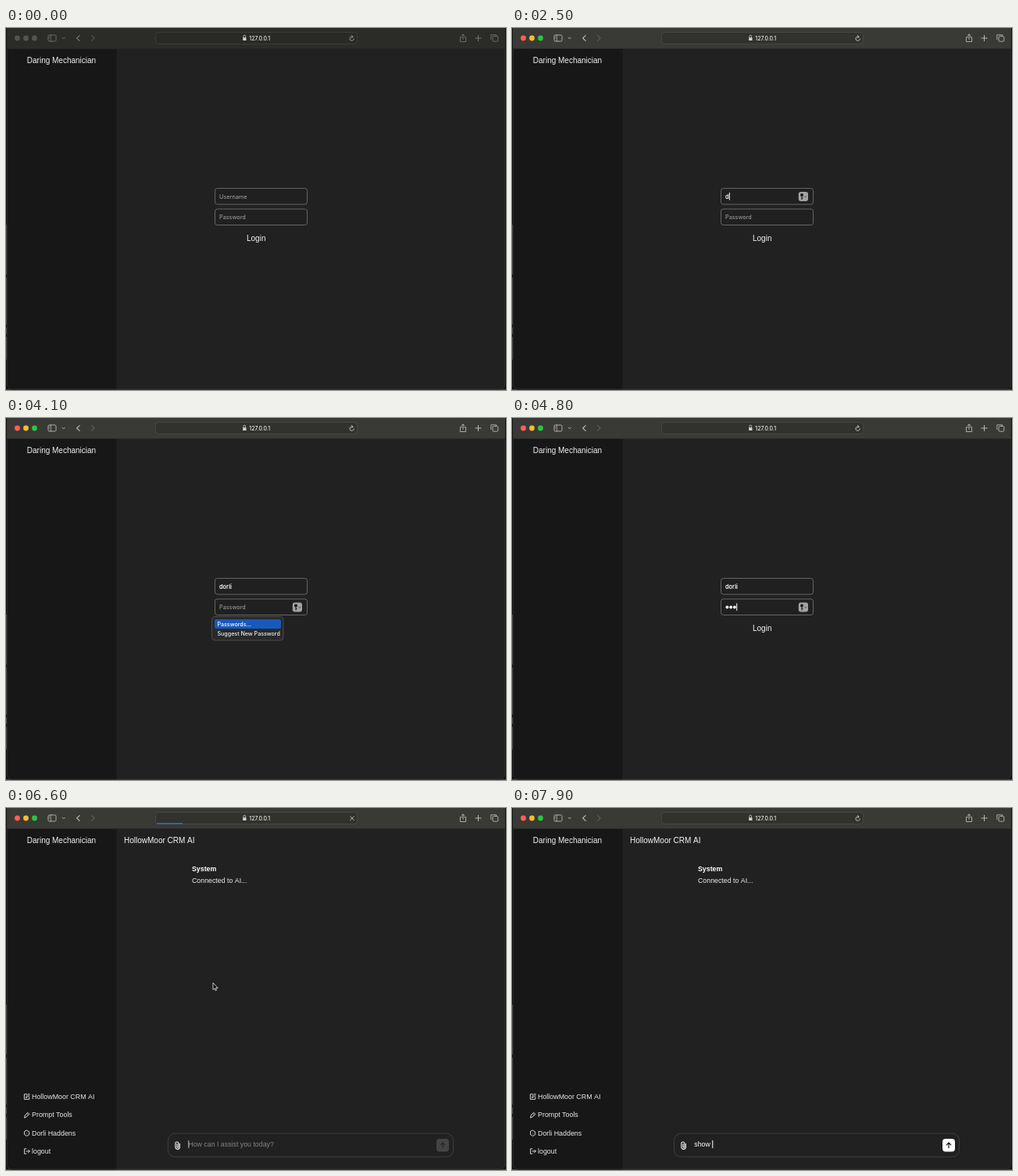
Animation of 640x464 px, one loop 8 s. Source, as an HTML page with a canvas:

```html
<!DOCTYPE html>
<html lang="en">
<head>
<meta charset="utf-8">
<title>Login and chat</title>
<style>
  html, body { margin: 0; width: 640px; height: 464px; overflow: hidden; background: #111; }
  canvas { display: block; }
</style>
</head>
<body>
<canvas id="stage" width="640" height="464"></canvas>
<script>
const ctx = document.getElementById('stage').getContext('2d');
const LOOP = 8000, STEP = 100;
const PAGE_FONT = '"Liberation Sans", Arial, sans-serif';
const UI_FONT = 'Inter, Roboto, sans-serif';
const APP = 'HollowMoor CRM AI';

const TIMES = { enter: 1000, activate: 1900, tab: 3400, menu: 3600, submit: 6000, load: 6200, loaded: 6800 };
const NAME_KEYS = [2400, 2700, 2800, 3000, 3200];
const PASS_KEYS = [4300, 4500, 4600, 5000, 5100, 5300, 5500];
const PROMPT_KEYS = [[7600, 's'], [7700, 'sh'], [7800, 'show'], [7900, 'show ']];
const POINTER_PATH = [[1000, 41, 16], [1400, 297, 130], [1800, 282, 216]];

const between = (t, a, b) => t >= a && t < b;
const lastKey = (keys, t, start) => keys.reduce((last, k) => k <= t ? k : last, start);
const typed = (keys, t) => keys.filter(k => k <= t).length;
const blinkOn = (t, since) => (t - since) % 1000 < 500;

function text(str, x, y, size, color = '#ececec', weight = 400, family = PAGE_FONT) {
  ctx.font = `${weight} ${size}px ${family}`;
  ctx.fillStyle = color;
  ctx.fillText(str, x, y);
  return x + ctx.measureText(str).width;
}

function rect(x, y, w, h, color) {
  ctx.fillStyle = color;
  ctx.fillRect(x, y, w, h);
}

function box(x, y, w, h, r, fill, stroke, width = 0.8) {
  ctx.beginPath();
  ctx.roundRect(x, y, w, h, r);
  if (fill) { ctx.fillStyle = fill; ctx.fill(); }
  if (stroke) { ctx.strokeStyle = stroke; ctx.lineWidth = width; ctx.stroke(); }
}

function dot(x, y, r, color) {
  ctx.beginPath();
  ctx.arc(x, y, r, 0, Math.PI * 2);
  ctx.fillStyle = color;
  ctx.fill();
}

function path(d, x, y, stroke, width = 1, fill) {
  const shape = new Path2D(d);
  ctx.save();
  ctx.translate(x, y);
  ctx.lineCap = ctx.lineJoin = 'round';
  if (fill) { ctx.fillStyle = fill; ctx.fill(shape); }
  if (stroke) { ctx.strokeStyle = stroke; ctx.lineWidth = width; ctx.stroke(shape); }
  ctx.restore();
}

function drawToolbar(t) {
  const active = t >= TIMES.activate;
  const loading = between(t, TIMES.submit, TIMES.loaded);
  const icon = active ? '#b9b9b4' : '#74746f';
  rect(1, 0, 638, 27, active ? '#393a35' : '#2b2c28');
  rect(1, 26, 638, 1, active ? '#292a27' : '#252522');

  const lights = active ? ['#fe5f57', '#febc2e', '#28c840'] : ['#555550', '#555550', '#555550'];
  lights.forEach((color, i) => dot(14.5 + i * 11, 13, 3.4, color));

  box(54, 9, 10, 8, 1.5, null, icon, 0.9);
  path('M0 0V8 M-2 2H-1.8 M-2 4H-1.8', 57.3, 9, icon, 0.8);
  path('M-1.6 -.8 L0 .8 L1.6 -.8', 73.7, 13, icon, 1);
  path('M2 -3.4 L-1.6 0 L2 3.4', 92.2, 13, icon, 1.1);
  path('M-2 -3.4 L1.6 0 L-2 3.4', 111.5, 13, active ? '#5d5e58' : '#52534e', 1.1);
  path('M-1.5 -1.3H-3.6V4.5H3.6V-1.3H1.5 M0 1.4V-5 M-1.8 -3.3L0 -5L1.8 -3.3', 585, 13, icon, 0.9);
  path('M-3.6 0H3.6 M0 -3.6V3.6', 604.5, 13, icon, 1);
  path('M-4.4 1.8V-4H2.4V-2.2', 625.2, 12.8, icon, 0.9);
  box(623, 10.6, 6.8, 6.6, 1.3, null, icon, 0.9);

  box(191.5, 5.5, 258, 15, 4, active ? '#31322e' : '#292a26', active ? '#4c4d48' : '#41423e');
  path('M-1.3 0V-1.8A1.3 1.5 0 0 1 1.3 -1.8V0', 305.3, 12.5, '#d4d4d0', 0.8);
  box(303.2, 12.3, 4.3, 3.8, 0.6, '#d4d4d0');
  text('127.0.0.1', 311.3, 15.6, 6.9, '#f0f0ec', 500, UI_FONT);

  const mark = active ? '#d0d0cb' : '#aaaaa5';
  if (loading) {
    const done = Math.min(1, (t - TIMES.submit) / 400);
    rect(193, 19.2, 12 + 21 * done, 1.4, '#2475d8');
    path('M-2.3 -2.3L2.3 2.3 M2.3 -2.3L-2.3 2.3', 443, 13.2, mark, 0.9);
  } else {
    path('M1.2 -2.4A2.7 2.7 0 1 0 2.7 .2 M-.3 -4L1.3 -2.4L-.3 -.9', 442.8, 13.6, mark, 0.9);
  }
}

function drawKeyButton(y) {
  box(366.8, y, 12.2, 12, 3, '#a3a3a3');
  dot(371, y + 4, 2, '#1c1c1c');
  path('M0 0V5 M0 3.4H1', 371, y + 4.5, '#1c1c1c', 1.1);
  path('M-1.2 -.5L0 .6L1.2 -.5', 375.8, y + 6.2, '#333', 0.8);
}

function drawField(y, label, value) {
  box(267.5, y, 118, 20.5, 3, '#202020', '#777');
  if (!value) text(label, 273, y + 13.3, 7.3, '#a5a5a5', 400, UI_FONT);
}

function drawMenu() {
  box(263.5, 254.5, 91.5, 30.5, 4, '#292929', '#555', 0.8);
  box(267, 258, 85, 12, 2, '#1859bd');
  text('Passwords…', 270.5, 266.8, 7.1, '#fff', 500, UI_FONT);
  text('Suggest New Password', 270.5, 278.6, 7.1, '#f0f0f0', 500, UI_FONT);
}

function drawLogin(t) {
  const name = 'dorli'.slice(0, typed(NAME_KEYS, t));
  const count = typed(PASS_KEYS, t);
  drawField(205.5, 'Username', name);
  drawField(232, 'Password', count);

  const nameEnd = text(name, 273, 218.7, 7.4, '#f4f4f4', 600, UI_FONT);
  for (let i = 0; i < count; i++) dot(275.4 + i * 4.75, 242.5, 1.95, '#f4f4f4');
  text('Login', 308, 273, 10, '#f4f4f4');

  if (between(t, TIMES.activate, TIMES.tab)) {
    drawKeyButton(210);
    if (blinkOn(t, lastKey(NAME_KEYS, t, TIMES.activate))) rect(nameEnd + 0.3, 211, 1, 9.5, '#fff');
  } else if (t >= TIMES.tab) {
    drawKeyButton(236.5);
    if (blinkOn(t, lastKey(PASS_KEYS, t, TIMES.tab))) {
      rect(273 + count * 4.75, 237.5, 1, 9.5, '#fff');
    }
  }
  if (between(t, TIMES.menu, PASS_KEYS[0])) drawMenu();
}

function drawSidebar() {
  const color = '#e8e8e8';
  path('M.3 -3.2H-3.2V3.4H3.2V0 M-1 1.2L-.6 -.6L2.7 -3.8L3.8 -2.7L.6 .7Z', 26.6, 370, color, 0.9);
  path('M-3 3.2L-2.4 .5L1.2 -3.2L3.2 -1.2L-.4 2.4Z M.1 -2L2 -.1', 26.6, 393.5, color, 0.9);
  path('M0 -3.6L3.1 -1.8V1.8L0 3.6L-3.1 1.8V-1.8Z', 26.6, 416.8, color, 0.9);
  ctx.beginPath();
  ctx.arc(26.6, 416.8, 1.1, 0, Math.PI * 2);
  ctx.stroke();
  path('M-.8 -3.2H-3.1V3.2H-.8 M-.8 0H3.6 M1.9 -1.8L3.7 0L1.9 1.8', 26.7, 440, color, 0.9);

  [APP, 'Prompt Tools', 'Dorli Haddens', 'logout'].forEach((label, i) =>
    text(label, 33, 373.1 + i * 23.3, 8.9, color));
}

function drawChat(t) {
  drawSidebar();
  text(APP, 151, 44.6, 10, '#f8f8f8');
  text('System', 238, 80.8, 8.8, '#fff', 700);
  text('Connected to AI...', 238, 96, 8.8);

  box(207.4, 417.2, 365.2, 30, 9, '#212121', '#474747');
  path('M2.8 -2V2.2A2.8 2.8 0 0 1 -2.8 2.2V-2.4A2 2 0 0 1 1.2 -2.4V1.9A.6 .6 0 0 1 -.7 1.9V-1.8',
    219.6, 432.4, '#f2f2f2', 1.1);

  const prompt = PROMPT_KEYS.reduce((s, [at, value]) => at <= t ? value : s, '');
  const since = lastKey(PROMPT_KEYS.map(key => key[0]), t, TIMES.load);
  const end = text(prompt, 233.3, 433.7, 8.8, '#fff');
  if (!prompt) text('How can I assist you today?', 233.3, 433.7, 8.8, '#858585');
  if (blinkOn(t, since)) rect(end, 426, 1, 10, prompt ? '#fff' : '#b5b5b5');

  box(551, 424, 16, 16.5, 4, prompt ? '#fff' : '#444');
  path('M0 3.3V-3.2 M-2.8 -.5L0 -3.3L2.8 -.5', 559, 432.3, prompt ? '#111' : '#252525', 1.2);
}

function pointerAt(t) {
  if (between(t, TIMES.load, TIMES.loaded)) return [265, 224.5];
  if (!between(t, TIMES.enter, NAME_KEYS[0])) return null;
  const next = POINTER_PATH.findIndex(p => p[0] > t);
  if (next < 0) return POINTER_PATH.at(-1).slice(1);
  const [t0, x0, y0] = POINTER_PATH[next - 1], [t1, x1, y1] = POINTER_PATH[next];
  const k = (t - t0) / (t1 - t0);
  return [x0 + (x1 - x0) * k, y0 + (y1 - y0) * k];
}

function drawWindow() {
  rect(0, 0, 640, 464, '#111');
  [[252, 64], [320, 60], [384, 8], [396, 29]].forEach(([y, h]) => rect(0, y, 1, h, '#4a4a4a'));
  rect(0, 463, 640, 1, '#4a4a4a');
  box(1, -6, 638, 469.4, 6, '#212121');
  ctx.save();
  ctx.clip();
  rect(1, 27, 140.5, 437, '#171717');
  ctx.restore();
  box(1.4, -6, 637.2, 469, 6, null, '#343434', 0.7);
}

function render(t) {
  drawWindow();
  drawToolbar(t);
  text('Daring Mechanician', 26.8, 44.6, 10, '#f0f0f0');
  if (t < TIMES.load) drawLogin(t);
  else drawChat(t);
  const pointer = pointerAt(t);
  if (pointer) path('M0 0V8.4L1.9 6.7L3.2 9.5L4.6 8.8L3.3 6.2H5.8Z', ...pointer, '#e6e6e6', 0.9, '#000');
}

function tick(now) {
  render(Math.floor((now % LOOP) / STEP) * STEP);
  requestAnimationFrame(tick);
}
requestAnimationFrame(tick);
</script>
</body>
</html>
```
